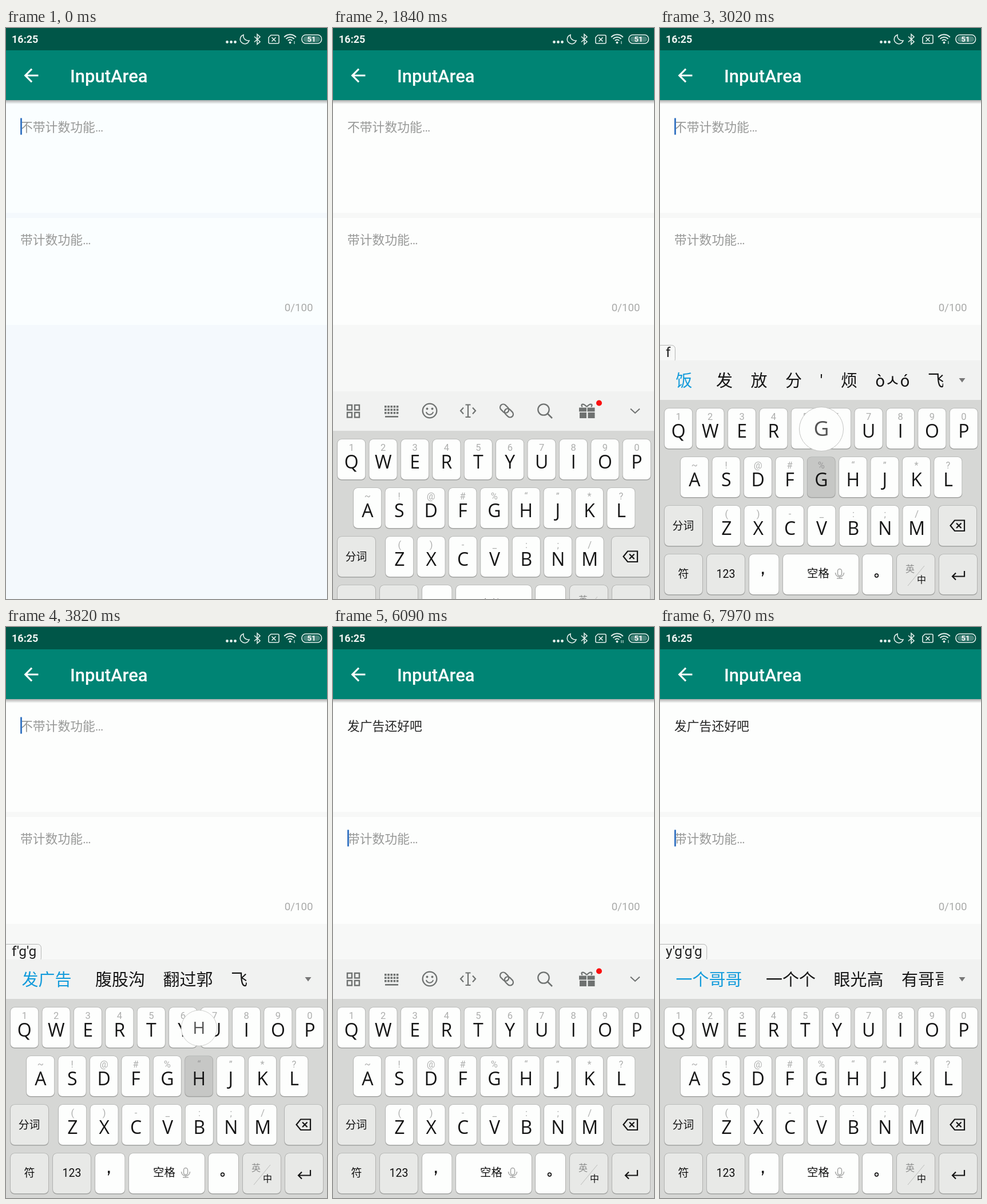
These frames come from a looping animation (561 by 998 pixels, 8000 ms). An HTML page with a canvas:

```html
<!DOCTYPE html>
<html lang="zh">
<head>
<meta charset="utf-8">
<style>
html, body { margin: 0; height: 100%; overflow: hidden; background: #f7f8f7; }
canvas { display: block; }
</style>
</head>
<body>
<canvas width="561" height="998"></canvas>
<script>
const ctx = document.querySelector('canvas').getContext('2d');
const LOOP = 8000, TAU = Math.PI * 2;
const GRAY = '#6f7271', WHITE = '#fdfefd';
const clamp = v => Math.min(1, Math.max(0, v));

// The caret is on at the start and flips at each of these times.
const blinks = [80, 520, 980, 1120, 1620, 2530, 3040, 3530, 4030, 4530, 5020,
  5200, 5720, 6090, 6210, 6680, 7180, 7680];
const COMMIT = 5200, SWITCH = 6090, HOLD = 120, FADE = 80;

// Key presses: time, key, composed text and candidates after release.
const presses = [
  [2530, 'F', 'f', "饭 发 放 分 ' 烦 òㅅó 飞"],
  [2950, 'G', "f'g", '发个 覆盖 饭馆 法国 风格'],
  [3350, 'G', "f'g'g", '发广告 腹股沟 翻过郭 飞'],
  [3780, 'H', "f'g'g'h", '发广告和 发广告 腹股沟 飞'],
  [4170, 'H', "f'g'g'h'h", '发广告很好 发广告 腹股沟 飞'],
  [4480, 'B', "f'g'g'h'h'b", '发广告还好吧 发广告 腹股沟 飞'],
  [6690, 'Y', 'y', '一 有 要 也 用 与 又 以'],
  [7130, 'G', "y'g", '一个 应该 有个 员工 阳光'],
  [7540, 'G', "y'g'g", '一个个 眼光高 有哥哥 一个'],
  [7750, 'G', "y'g'g'g", '一个哥哥 一个个 眼光高 有哥哥'],
];

const keys = {};
const addRow = (letters, hints, x, y) => [...letters].forEach((c, i) =>
  keys[c] = { x: x + i * 55.4, y, hint: hints[i] });
addRow('QWERTYUIOP', '1234567890', 8, 665);
addRow('ASDFGHJKL', '~!@#%“”*?', 36, 750);
addRow('ZXCVBNM', '()-_:;/', 92, 835);

function text(s, x, y, size, color, weight = 400, align = 'center', face = 'Roboto') {
  ctx.font = `${weight} ${size}px "${face}", "Noto Sans CJK SC", "Noto Sans CJK JP", sans-serif`;
  ctx.fillStyle = color;
  ctx.textAlign = align;
  ctx.fillText(s, x, y);
  return ctx.measureText(s).width;
}
function rect(x, y, w, h, color) {
  ctx.fillStyle = color;
  ctx.fillRect(x, y, w, h);
}
function disc(x, y, r, color) {
  ctx.fillStyle = color;
  ctx.beginPath();
  ctx.arc(x, y, r, 0, TAU);
  ctx.fill();
}
function ring(x, y, r, color, width, from = 0, to = TAU) {
  ctx.strokeStyle = color;
  ctx.lineWidth = width;
  ctx.beginPath();
  ctx.arc(x, y, r, from, to);
  ctx.stroke();
}
function line(d, color, width) {
  ctx.strokeStyle = color;
  ctx.lineWidth = width;
  ctx.stroke(new Path2D(d));
}
function fill(d, color) {
  ctx.fillStyle = color;
  ctx.fill(new Path2D(d));
}
function box(x, y, w, h, r) {
  ctx.beginPath();
  ctx.roundRect(x, y, w, h, r);
}

function statusBar(t) {
  rect(0, 0, 561, 39, '#005648');
  text('16:25', 10, 26, 18, '#eef4f2', 700, 'left');
  const c = '#e4efec';
  for (const x of [386.5, 393.5, 400.5]) disc(x, 24.5, 2.4, c);
  line('M415 12A8 8 0 1 0 425 22A8.5 8.5 0 0 1 415 12Z', c, 1.6);
  line('M434 15L444 24L439 28.5V11L444 15.5L434 24.5', c, 1.6);
  line('M463 12.5H475Q477 12.5 477 14.5V25Q477 27 475 27H461Q459 27 459 25V16.5Z', c, 1.6);
  line('M464.5 16.5L471.5 23.5M471.5 16.5L464.5 23.5', c, 1.7);
  for (const r of [5, 9.5, 14]) ring(496.5, 25.5, r, c, 2, -2.4, -0.74);
  disc(496.5, 25.5, 2, c);
  line('M504 23V28', '#a9cbc3', 1.4);
  if (t > 4200 && t < 6400) line('M507 23V28', '#a9cbc3', 1.4);
  ctx.strokeStyle = c;
  ctx.lineWidth = 1.6;
  box(517, 12, 34.5, 15, 7);
  ctx.stroke();
  ctx.fillStyle = '#ffffff48';
  box(519.5, 14.5, 29.5, 10, 5);
  ctx.fill();
  text('51', 534, 24, 13, '#fff', 700);
}

function header() {
  rect(0, 39, 561, 87, '#008474');
  const g = ctx.createLinearGradient(0, 126, 0, 133);
  g.addColorStop(0, '#00000050');
  g.addColorStop(1, '#00000000');
  rect(0, 126, 561, 7, g);
  ctx.save();
  ctx.translate(25.3, 64.3);
  ctx.scale(1.558, 1.558);
  fill('M20 11H7.83L13.42 5.41L12 4L4 12L12 20L13.41 18.59L7.83 13H20Z', '#fff');
  ctx.restore();
  text('InputArea', 112, 95, 31, '#fff', 500, 'left');
}

function fields(t) {
  const early = t < 1120, paper = early ? '#fafeff' : WHITE;
  rect(0, 0, 561, 998, early ? '#f4f9fd' : '#f7f8f7');
  rect(0, 126, 561, 197, paper);
  rect(0, 332, 561, 187, paper);
  const done = t >= COMMIT;
  text(done ? '发广告还好吧' : '不带计数功能…', 25, 181, 21.8, done ? '#262626' : '#989998', 400, 'left');
  text('带计数功能…', 25, 377.5, 21.8, '#989998', 400, 'left');
  text('0/100', 536.5, 495, 18.7, '#a9aaa9', 400, 'right');
  if (blinks.filter(b => b <= t).length % 2 === 0) {
    const second = t >= SWITCH;
    rect(done && !second ? 155 : 25, second ? 354.5 : 157.5, 3, 29, '#3b78c4');
  }
}

function toolbar() {
  ctx.strokeStyle = GRAY;
  ctx.lineWidth = 2.4;
  for (const x of [25, 38]) for (const y of [605, 618]) ctx.strokeRect(x, y, 8, 8.5);
  for (let i = 0; i < 15; i++) rect(90 + i % 5 * 5.2, 606 + (i / 5 | 0) * 5.5, 3.6, 3.6, GRAY);
  rect(91, 624, 23, 2.6, GRAY);
  ring(169, 615, 12.3, GRAY, 2.3);
  disc(164.5, 611.5, 1.9, GRAY);
  disc(173.5, 611.5, 1.9, GRAY);
  ring(169, 615.5, 6.3, GRAY, 2, 0.25, 2.9);
  line('M228 609.5L223 615L228 620.5M244 609.5L249 615L244 620.5M231.5 604.5H240.5M231.5 626H240.5M236 604.5V626', GRAY, 2.2);
  ctx.save();
  ctx.translate(303.5, 615);
  ctx.rotate(Math.PI / 4);
  ctx.lineWidth = 2.2;
  for (const x of [-14, -3]) {
    box(x, -5.5, 17, 11, 5.5);
    ctx.stroke();
  }
  ctx.restore();
  ring(368, 613, 9.7, GRAY, 2.3);
  line('M375 620L383 628', GRAY, 2.5);
  for (const x of [430, 444.5]) {
    rect(x, 609.5, 13, 7, GRAY);
    rect(x + 1, 618, 12, 10, GRAY);
  }
  line('M443.5 608C436 600 432 605 436 608M443.5 608C451 600 455 605 451 608', GRAY, 2.2);
  disc(465, 601.5, 5, '#fb1010');
  line('M520 611.5L528 619L536 611.5', GRAY, 2);
}

function candidates([, , typed, words]) {
  const w = text(typed, 10, 575, 24.5, '#222', 400, 'left');
  ctx.strokeStyle = '#b4b5b4';
  ctx.lineWidth = 1;
  box(-4, 554.5, w + 22, 30, 6);
  ctx.stroke();
  rect(0, 581, 561, 69, '#f1f2f1');
  ctx.save();
  ctx.beginPath();
  ctx.rect(0, 581, 495, 69);
  ctx.clip();
  let x = 27.5;
  words.split(' ').forEach((s, i) => {
    x += text(s, x, 627, 29, i ? '#161616' : '#129bdb', 400, 'left') + (i ? 31.5 : 41.5);
  });
  ctx.restore();
  fill('M522.5 612H533.5L528 619.5Z', '#777');
  if (typed.length > 10) {
    line('M542 554A4.5 4.5 0 0 1 541 545.5A7 7 0 0 1 554 545A4.5 4.5 0 0 1 555 554Z', '#8f908f', 1.6);
    ring(548.5, 549.5, 3, '#8f908f', 1.4);
  }
}

function cap(x, y, w, color = WHITE) {
  ctx.fillStyle = '#a2a3a1';
  box(x - 0.7, y - 0.5, w + 1.4, 72, 7.5);
  ctx.fill();
  ctx.fillStyle = color;
  box(x, y, w, 70, 7);
  ctx.fill();
}

function keyboard(press, held) {
  rect(0, 650, 561, 348, '#d6d7d5');
  for (const c in keys) {
    const { x, y, hint } = keys[c], down = held && press[1] === c;
    cap(x, y, 48.3, down ? '#c6c7c5' : WHITE);
    text(hint, x + 24.3, y + 20, 16.5, down ? '#999' : '#adaead');
    text(c, x + 24.3, y + 51, 32, '#151515', 400, 'center', 'Open Sans');
  }
  const soft = '#e8e9e7';
  cap(8, 835, 66, soft);
  text('分词', 40.5, 876.5, 18.8, '#111', 500);
  cap(487, 835, 66, soft);
  line('M515 860.5H532V879H515L507.5 869.7ZM518 865.5L526.5 874M526.5 865.5L518 874', '#151515', 2.2);
  cap(8, 920, 66, soft);
  text('符', 41, 960.5, 19, '#111');
  cap(82, 920, 66, soft);
  text('123', 115, 960.5, 19.5, '#111');
  cap(156, 920, 51.5);
  fill('M178 950.5H181.5V953.5L179.5 958.5H178L179 954H178Z', '#111');
  cap(215, 920, 132);
  text('空格', 276.5, 960, 19.4, '#111', 500);
  line('M310.5 949A3.5 3.5 0 0 1 317.5 949V954A3.5 3.5 0 0 1 310.5 954ZM306.5 952A7.5 7.5 0 0 0 321.5 952M314 959.5V962M309 962H319', '#a6a7a6', 1.5);
  cap(354, 920, 52);
  ring(378.5, 957, 2.9, '#111', 1.6);
  cap(414, 920, 66, soft);
  text('英', 437, 950.5, 16, '#8d8e8d');
  line('M433 975L462 940', '#bcbdbb', 1);
  text('中', 457, 970, 16, '#111', 500);
  cap(488, 920, 66, soft);
  line('M532 949V958.5H511M517 952.5L511 958.5L517 964.5', '#151515', 2.2);
}

function popup(press, age) {
  const { x, y } = keys[press[1]];
  ctx.save();
  ctx.globalAlpha = 1 - clamp((age - HOLD) / FADE);
  ctx.translate(x + 24.4, y - 49);
  const s = 0.4 + 0.6 * clamp(age / 60);
  ctx.scale(s, s);
  disc(0, 0, 38.5, WHITE);
  ring(0, 0, 38.5, '#c3c4c2', 1);
  text(press[1], 0, 12, 37, '#555', 400, 'center', 'Open Sans');
  ctx.restore();
}

function draw(t) {
  fields(t);
  header();
  statusBar(t);
  const drop = 417 * (1 - clamp((t - 1593) / 621)) ** 4;
  if (drop >= 417) return;
  const press = presses.findLast(p => p[0] <= t);
  const age = press ? t - press[0] : Infinity;
  const typed = presses.findLast(p => p[0] + HOLD <= t);
  ctx.save();
  ctx.translate(0, Math.round(drop));
  if (typed && (t < COMMIT || typed[0] > COMMIT)) candidates(typed);
  else {
    rect(0, 581, 561, 69, '#f1f2f1');
    toolbar();
  }
  keyboard(press, age < HOLD);
  if (age < HOLD + FADE) popup(press, age);
  ctx.restore();
}

const start = performance.now();
function tick() {
  draw((performance.now() - start) % LOOP);
  requestAnimationFrame(tick);
}
tick();
</script>
</body>
</html>
```
